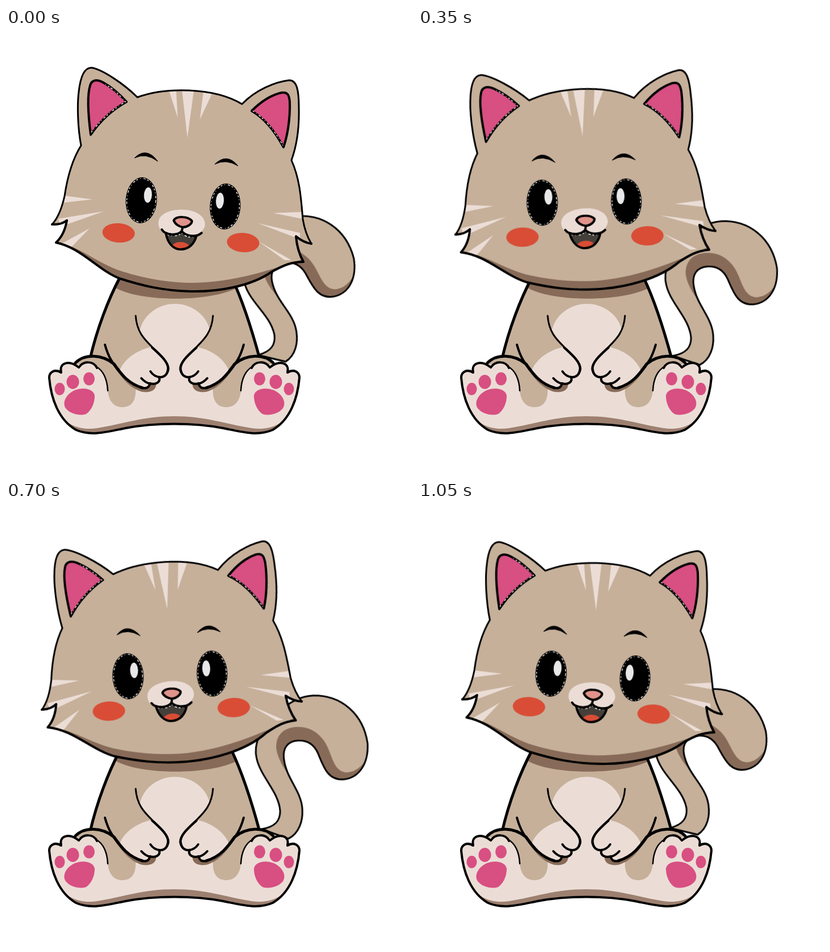
These frames come from a looping animation (714 px wide and 784 px high, 1.12 s). An HTML page without scripts:

```html
<!DOCTYPE html>
<html lang="en">
<head>
<meta charset="utf-8">
<title>Kitten</title>
<style>
  html, body { margin: 0; width: 100%; height: 100%; overflow: hidden; background: #fff; }
  svg { display: block; width: 714px; height: 784px; }
  .tan { fill: #c6b09a; }
  .dark { fill: #876b58; }
  .cream { fill: #ebddd6; }
  .pink { fill: #d84f82; }
  .blush { fill: #d94d36; }
  .line { fill: none; stroke: #000; stroke-width: 4; stroke-linecap: round; stroke-linejoin: round; }
  .thin { stroke-width: 3; }
  .bold { stroke-width: 5; }
  .inner { fill: #d84f82; }
  .spark { fill: none; stroke: #fff; stroke-width: 1.3; stroke-dasharray: 3 4 1 5 4 3; }

  .head { transform-origin: 276px 526px; animation: nod 1120ms infinite; }
  .tail { transform-origin: 430px 633px; animation: wag 1120ms infinite; }
  @keyframes nod {
    0%, 100% { transform: rotate(0deg); animation-timing-function: steps(8, end); }
    50% { transform: rotate(-8.1deg); animation-timing-function: steps(8, end); }
  }
  @keyframes wag {
    0%, 93.75%, 100% { transform: rotate(-9deg); }
    6.25% { transform: rotate(-9deg); animation-timing-function: steps(7, end); }
    50% { transform: rotate(0deg); animation-timing-function: steps(7, end); }
  }
</style>
</head>
<body>
<svg viewBox="0 0 714 784">
  <defs>
    <path id="tailShape" d="M498 598C517 590 526 568 525 545C524 515 500 492 497 460C494 437 506 426 523 426C542 426 552 437 557 450C566 475 572 498 599 498C629 497 645 470 645 437C640 385 603 349 553 348C525 348 505 362 490 376C465 394 446 420 448 448C451 485 485 512 486 549C485 566 476 576 452 579Z"/>
    <path id="trunk" d="M200 440C180 478 160 530 148 582L178 640H414L446 582C432 530 416 480 397 440Z"/>
    <path id="base" d="M160 598C130 590 100 590 96 604C84 601 76 607 76 616C79 652 92 690 123 708C150 720 180 711 210 705C262 695 330 695 382 705C412 711 442 720 469 708C500 690 513 652 516 616C516 607 508 601 496 604C492 590 462 590 432 598Z"/>
    <path id="skull" d="M132 207C126 175 125 135 128 112C131 85 138 69 151 70C169 73 207 98 231 122C280 104 365 104 415 134C440 108 474 95 498 92C511 92 515 108 515 140C516 175 511 208 502 233C517 266 519 302 522 337C525 355 531 370 537 380Q523 378 510 367Q512 392 523 412C503 412 490 417 468 429C430 456 370 465 325 464C275 463 236 453 199 441C160 425 132 387 88 378Q103 364 107 339Q97 347 81 346C93 333 99 314 103 296C108 262 117 231 132 207Z"/>
    <path id="earL" d="M149 188C144 150 143 117 148 101C151 91 160 90 171 96C189 106 201 118 212 130C185 145 166 163 149 188Z"/>
    <path id="earR" d="M432 146C448 130 467 118 484 114C496 112 498 119 499 130C500 160 495 190 488 210C473 182 456 160 432 146Z"/>
    <path id="jaw" d="M281 361C290 366 302 365 309 359C317 366 326 368 335 366C331 381 321 390 307 390C294 390 284 379 281 361Z"/>
    <clipPath id="inTail"><use href="#tailShape"/></clipPath>
    <clipPath id="inTrunk"><use href="#trunk"/></clipPath>
    <clipPath id="inBase"><use href="#base"/></clipPath>
    <clipPath id="inSkull"><use href="#skull"/></clipPath>
    <clipPath id="inJaw"><use href="#jaw"/></clipPath>

    <g id="limbs">
      <!-- thigh and foot -->
      <path class="tan" d="M122 592C138 575 170 573 192 590L228 636C229 660 218 668 205 668C190 668 181 658 179 640C178 616 172 602 158 598Z"/>
      <path class="cream" d="M96 606C93 590 110 584 127 598C136 585 154 586 160 599C172 605 178 620 178 640L120 650Z"/>
      <path class="line" d="M76 616C76 606 86 600 97 607C93 590 110 584 128 598C136 586 154 586 160 599"/>
      <path class="line" style="stroke-width:2.5" d="M158 596C172 604 178 620 179 639"/>
      <g class="pink">
        <path d="M128 636C142 633 155 638 156 648C156 661 150 674 141 680C130 684 113 680 105 670C97 658 109 640 128 636Z"/>
        <ellipse cx="94.500" cy="636" rx="9" ry="11"/>
        <ellipse cx="117.500" cy="623.500" rx="11" ry="12.500"/>
        <ellipse cx="146" cy="618" rx="10" ry="11.500"/>
      </g>
      <!-- arm and hand -->
      <path class="dark" d="M190 594C203 618 220 636 240 641C254 643 264 638 264 628L230 615Z"/>
      <path class="tan" d="M228 507C230 536 244 549 257 562L236 634C205 620 188 592 176 560L200 515Z"/>
      <path class="dark" d="M174 557C181 590 204 625 236 634L222 625C206 604 185 592 174 557Z"/>
      <path class="cream" d="M200 603C210 580 234 566 257 562C272 576 286 588 286 601C284 611 278 615 270 615C273 624 264 630 254 627C252 635 240 636 232 632C216 625 206 613 200 603Z"/>
      <path class="line bold" d="M122 590C138 574 168 574 190 592C203 611 216 627 240 634"/>
      <path class="line thin" d="M228 507C230 536 244 549 257 562C272 576 286 588 286 601C284 611 278 616 269 615"/>
      <path class="line" d="M174 558C180 580 188 592 200 606M257 563C272 577 285 588 285 600C284 611 278 616 269 615C273 624 263 629 253 626C252 635 244 636 236 633M254 605Q260 614 270 615M238 617Q245 625 254 627"/>
    </g>
  </defs>

  <rect width="714" height="784" fill="#fff"/>

  <g class="tail">
    <use href="#tailShape" class="tan"/>
    <path class="dark" clip-path="url(#inTail)" d="M528 535C524 505 487 475 484 437C485 411 502 402 522 402C552 402 570 424 577 447C584 468 588 484 606 486C625 486 638 472 648 455V505H560L545 440L523 426L500 440L510 490Z"/>
    <use href="#tailShape" class="line thin"/>
  </g>

  <g>
    <use href="#trunk" class="tan"/>
    <path class="dark" clip-path="url(#inTrunk)" d="M180 430H415V452C375 485 220 485 185 452Z"/>
    <path class="line bold" d="M200 440C180 478 160 530 148 582M397 440C416 480 432 530 446 582"/>
    <ellipse class="cream" cx="297" cy="545" rx="63" ry="59"/>
    <use href="#base" class="cream"/>
    <path clip-path="url(#inBase)" fill="#9d8070" d="M88 674C108 702 132 709 160 705C205 698 240 684 296 684C352 684 387 698 432 705C460 709 484 702 504 674V730H88Z"/>
    <path class="line" d="M76 616C79 652 92 690 123 708C150 720 180 711 210 705C262 695 330 695 382 705C412 711 442 720 469 708C500 690 513 652 516 616"/>
    <use href="#limbs"/>
    <use href="#limbs" transform="matrix(-1 0 0 1 592 0)"/>
  </g>

  <g class="head">
    <use href="#skull" class="tan"/>
    <g clip-path="url(#inSkull)">
      <path class="dark" d="M88 377C128 383 160 415 205 429C250 443 290 449 328 449C400 448 460 428 523 407V480H88Z"/>
      <path class="cream" d="M285 105H299L302 158ZM309 105H331L319 193ZM348 105L364 112L341 161ZM100 295L152 302L98 308ZM92 336L172 323L96 350ZM96 381L147 353L112 389ZM525 324L470 326L525 337ZM517 361L443 344L517 372ZM490 409L444 376L502 409Z"/>
    </g>
    <use href="#skull" class="line thin"/>
    <path class="line" d="M523 412C503 412 490 417 468 429C430 456 370 465 325 464C275 463 236 453 199 441C160 425 132 387 88 378Q103 364 107 339Q97 347 81 346M537 380Q523 378 510 367Q512 392 523 412"/>

    <use href="#earL" class="line inner"/>
    <use href="#earR" class="line inner"/>
    <path class="spark" d="M150 184C166 163 185 145 210 130C201 119 189 107 171 97M434 146C456 160 473 182 487 207"/>

    <path d="M226 229Q247 208 267 235Q246 219 226 229ZM367 240Q389 219 408 243Q387 230 367 240Z" stroke="#000" stroke-linejoin="round"/>

    <g transform="rotate(4 238 303)">
      <ellipse cx="238" cy="303.500" rx="27.500" ry="40.500"/>
      <ellipse class="spark" cx="238" cy="303.500" rx="25.500" ry="38.500"/>
      <ellipse cx="249" cy="293.500" rx="7" ry="13.500" fill="#e8e8e8"/>
    </g>
    <g transform="rotate(4 386 314)">
      <ellipse cx="385.500" cy="314.500" rx="27" ry="40.500"/>
      <ellipse class="spark" cx="385.500" cy="314.500" rx="25" ry="38.500"/>
      <ellipse cx="375.500" cy="305" rx="7" ry="14" fill="#e8e8e8"/>
    </g>

    <ellipse class="blush" cx="198" cy="361" rx="28.500" ry="17" transform="rotate(4 198 361)"/>
    <ellipse class="blush" cx="417" cy="378" rx="28.500" ry="17" transform="rotate(4 417 378)"/>

    <path class="cream" d="M268 344C268 328 287 320 309 320C333 320 350 331 350 346C349 361 328 371 309 361C287 369 268 360 268 344Z"/>
    <use href="#jaw" fill="#453f3a"/>
    <ellipse class="blush" cx="307" cy="387" rx="16" ry="10" clip-path="url(#inJaw)"/>
    <use href="#jaw" class="line"/>
    <path class="spark" style="stroke-width:2" d="M284 364Q299 369 309 361Q318 370 332 368"/>
    <path class="line" d="M274 355C280 365 300 367 309 358C318 368 335 369 344 361M311 350L309 358"/>
    <path class="line" style="fill:#e0938a" d="M295 339C299 331 320 331 327 340C327 346 318 351 311 351C304 350 297 345 295 339Z"/>
  </g>
</svg>
</body>
</html>
```
